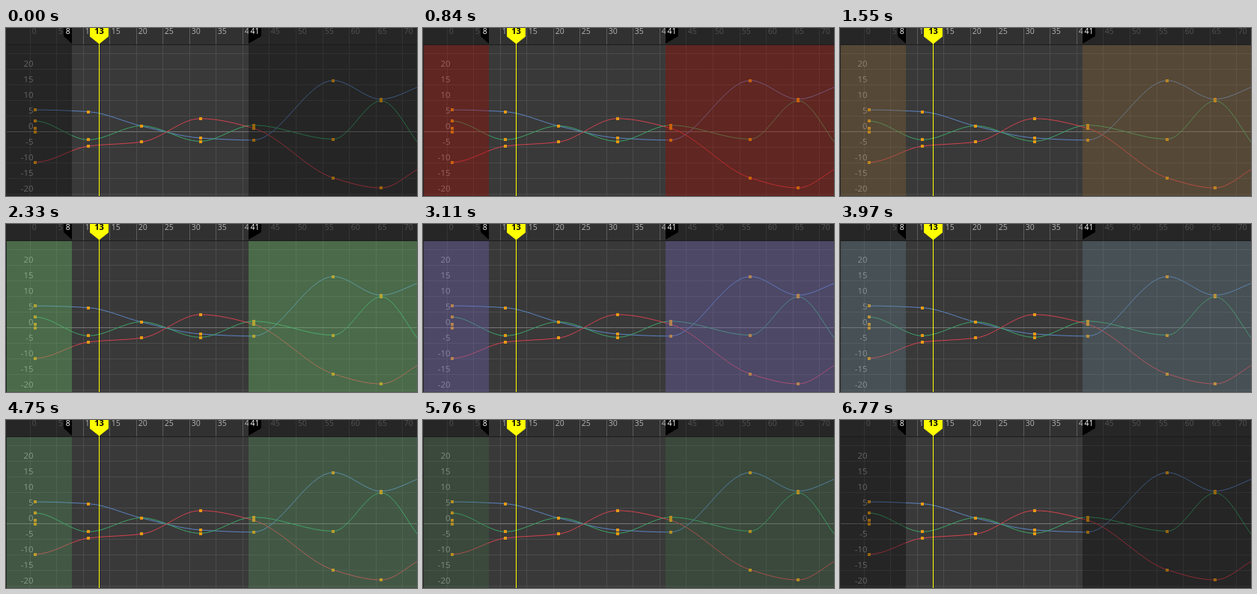
Animation of 549x226 px, one loop 9.09 s. Source, as an HTML page:

```html
<!DOCTYPE html>
<html lang="en">
<head>
<meta charset="utf-8">
<title>Graph editor range shading</title>
<style>
html, body { margin: 0; width: 100%; height: 100%; overflow: hidden; background: #393939; }
svg { display: block; width: 549px; height: 226px; font-family: "Open Sans", "Noto Sans", sans-serif; }
.grid { stroke: #4b4b4b; }
.mark { stroke: #5c5c5c; }
.axis { stroke: #777; }
.tick { font-size: 10.5px; fill: #b4b4b4; }
.value { font-size: 11.4px; fill: #9a9a9a; text-anchor: end; }
.curve { fill: none; stroke-width: 1; }
.key { fill: #e69a14; }
.flag { font-size: 10.5px; fill: #fff; }
.now { font-size: 11px; font-weight: 700; text-anchor: middle; }
.shade { animation: shade 9.09s step-end infinite; }
@keyframes shade {
  0% { fill: rgba(0, 0, 0, .35); }
  9.241% { fill: rgba(155, 10, 0, .4); }
  17.052% { fill: rgba(128, 95, 50, .4); }
  25.633% { fill: rgba(100, 180, 100, .4); }
  34.213% { fill: rgba(105, 95, 170, .4); }
  43.674% { fill: rgba(97, 125, 135, .35); }
  52.255% { fill: rgba(87, 160, 97, .3); }
  63.366% { fill: rgba(60, 110, 67, .3); }
  74.477%, 100% { fill: rgba(0, 0, 0, .35); }
}
</style>
</head>
<body>
<svg id="stage" viewBox="0 0 549 226"></svg>
<script>
const W = 549, H = 226, HEAD = 23;
const RANGE = [88, 324];
const stage = document.getElementById("stage");
const frameX = f => 32 + 7.11 * f;
const valueY = v => 139.5 - 4.2 * v;
const snap = n => Math.floor(n) + 0.5;

function add(tag, attrs, text) {
  const el = document.createElementNS("http://www.w3.org/2000/svg", tag);
  for (const name in attrs) el.setAttribute(name, attrs[name]);
  if (text !== undefined) el.textContent = text;
  stage.appendChild(el);
}

const box = (x, y, width, height, attrs) => add("rect", { x, y, width, height, ...attrs });
const line = (x1, y1, x2, y2, cls) => add("line", { x1, y1, x2, y2, class: cls });
const label = (x, y, cls, text) => add("text", { x, y, class: cls }, text);

// Auto tangents: flat at ends and extremes, otherwise the harmonic mean of both sides.
function slopeAt(points, i) {
  if (i === 0 || i === points.length - 1) return 0;
  const rise = k => (points[k + 1].y - points[k].y) / (points[k + 1].x - points[k].x);
  const a = rise(i - 1), b = rise(i);
  return a * b > 0 ? 2 * a * b / (a + b) : 0;
}

function curve(points, stroke) {
  let d = `M${points[0].x} ${points[0].y}`;
  for (let i = 1; i < points.length; i++) {
    const p = points[i - 1], q = points[i];
    const h = (q.x - p.x) / 3;
    d += `C${p.x + h} ${p.y + h * slopeAt(points, i - 1)}`
       + ` ${q.x - h} ${q.y - h * slopeAt(points, i)} ${q.x} ${q.y}`;
  }
  add("path", { d, stroke, class: "curve" });
}

const key = ({ x, y }) => box(Math.round(x) - 2, Math.round(y) - 2, 4, 4, { class: "key" });

box(0, 0, W, H, { fill: "#393939" });
box(0, 0, W, HEAD, { fill: "#313131" });

for (let f = 0; f <= 70; f += 5) {
  const x = snap(frameX(f));
  line(x, HEAD, x, H, "grid");
  line(x, 0, x, HEAD, "mark");
  label(x + 2.3, 7.8, "tick", f);
}
for (let v = -20; v <= 25; v += 5) {
  const y = snap(valueY(v));
  line(0, y, W, y, v ? "grid" : "axis");
  if (v < 25) label(36.5, y - 3.5, "value", v);
}

const frames = [1, 11, 21, 32, 42, 57, 66, 76];
const toPoint = (v, i) => ({ x: frameX(frames[i]), y: valueY(v) });
const channels = {
  "#5b86c4": [7, 6.4, 1.8, -2, -2.7, 16.4, 10.4, 15.5],
  "#3da468": [3.4, -2.6, 1.9, -3.1, 2.1, -2.4, 9.9, -7.7],
  "#d5424f": [-9.8, -4.6, -3.3, 4.2, 1.1, -14.8, -18, -10.1]
};
for (const color in channels) curve(channels[color].map(toPoint), color);
for (const color in channels) channels[color].map(toPoint).forEach(key);
[1, 0].forEach(v => key(toPoint(v, 0)));

// Shading outside the playback range
for (const [from, to] of [[1, RANGE[0]], [RANGE[1], W]]) {
  box(from, HEAD, to - from, H - HEAD, { class: "shade" });
  box(from, 0, to - from, HEAD, { fill: "rgba(32, 32, 32, .66)" });
}
box(0, 0, 1, H, { fill: "#252525" });
box(0, HEAD - 1, W, 1, { fill: "#1c1c1c" });

add("path", { d: "M77 0H88V21L77 11Z" });
add("path", { d: "M341 0H324V21L341 11Z" });
label(79.8, 7.8, "flag", 8);
label(326.5, 7.8, "flag", 41);

box(124, 10, 1, H, { fill: "#ff0" });
add("path", { d: "M112 0H137V11.5L124.5 21.5L112 11.5Z", fill: "#ff0" });
label(124.5, 8, "now", 13);
</script>
</body>
</html>
```
